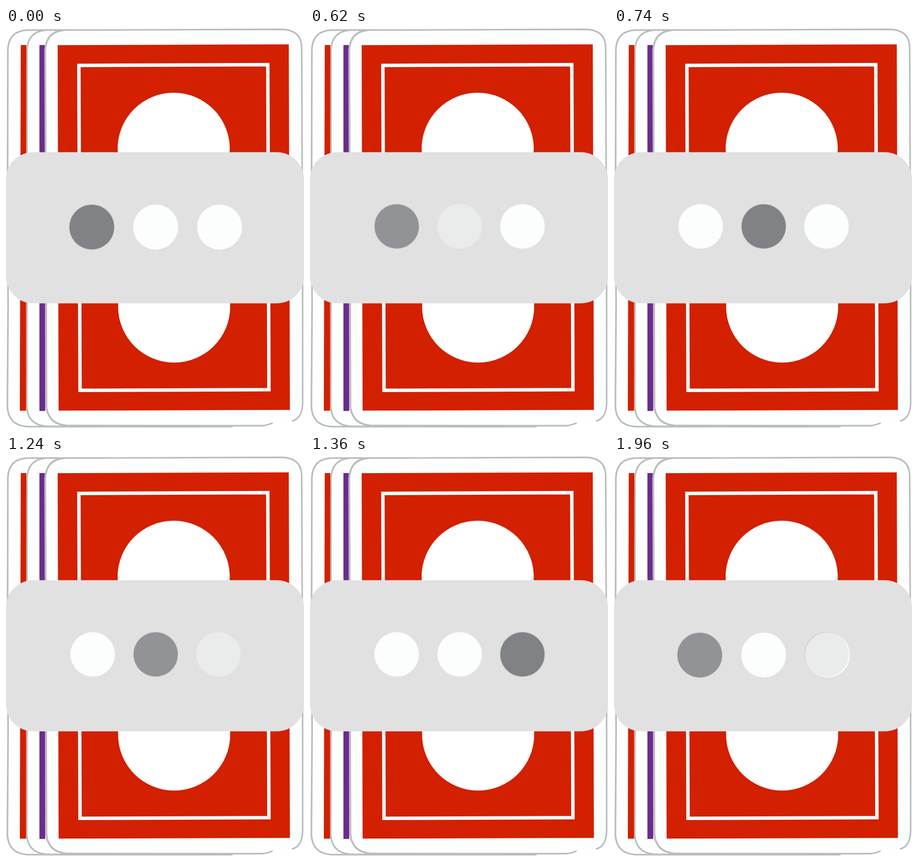
Write an HTML page that moves like this. It is 646 px wide and 868 px high and loops after 1.98 s.

```html
<!DOCTYPE html>
<html lang="en">
<head>
<meta charset="utf-8">
<style>
  html, body { margin: 0; width: 100%; height: 100%; overflow: hidden; background: #fff; }
  svg { display: block; width: 100%; height: 100%; }
</style>
</head>
<body>
<svg viewBox="0 0 646 868">
  <g fill="#fdfffe" stroke="#babdbd" stroke-width="3.6" stroke-linecap="round">
    <path d="M130 4.5H47Q5 6 4 48L3.5 300L4.5 600L3 822Q5 862 46 865H490"/>
    <path d="M130 4.5H88Q47 7 45.5 48V300V600L45 822Q47 861 88 864.5H490"/>
  </g>
  <g fill="#d22000">
    <path d="M32 37H44L43.5 830.5H30Z"/>
    <path fill="#6b2c8c" d="M72.5 37H84L85 831H72.5Z"/>
  </g>
  <path fill="#fdfffe" d="M126 4L598 2.5Q640 4 641 42L643 815Q642 848 620 853L556 863L130 862.5Q92 860 88 822L85 48Q87 8 126 4Z"/>
  <g fill="none" stroke="#babdbd" stroke-width="3.4">
    <path stroke-width="4" d="M126 4.5Q87 8 85 48L86 300L87 600L87.5 822Q92 859 130 862.5"/>
    <path d="M126 4.5L598 3Q640 4 641 42L642 300L643 600V815Q642 847 620 853"/>
    <path d="M130 862.5L556 863Q566 862 578 857"/>
  </g>
  <path fill="#d22000" d="M112 37.3L613 35.4L615.5 828.8L114 830.3Z"/>
  <path fill="none" stroke="#fff" stroke-width="7.4" d="M158 81.2L567.5 79.5L570 784.8L160.5 786.3Z"/>
  <circle cx="363.5" cy="262" r="121.5" fill="#fff"/>
  <circle cx="364.5" cy="604.5" r="121.5" fill="#fff"/>
  <rect y="269.5" width="646" height="328" rx="59" fill="#e1e1e1"/>
  <g id="under"></g>
  <g id="over"></g>
</svg>
<script>
  const LOOP = 1980, STEP = 20, FADE_STEPS = 7;
  const wide = { xs: [186, 324.5, 463], y: 432, r: 48.2 };
  const tight = { xs: [188, 324.5, 460.5], y: 430.5, r: 47.7 };

  // Each slide holds, then dissolves into the next one from `fade` on.
  const slides = [
    { row: wide, active: 0, fade: 200 },
    { row: tight, active: 0, fade: 620 },
    { row: tight, active: 1, fade: 1240 },
    { row: tight, active: 2, fade: 1860 }
  ];

  const under = document.getElementById("under");
  const over = document.getElementById("over");

  function slideMarkup({ row, active }) {
    const dots = row.xs.map((x, i) => {
      const color = i === active ? "#808285" : "#fcfefe";
      return `<circle cx="${x}" cy="${row.y}" r="${row.r}" fill="${color}" stroke="${color}" stroke-width="2" stroke-opacity="0.4"/>`;
    });
    return `<rect x="110" y="360" width="430" height="144" fill="#e1e1e1"/>${dots.join("")}`;
  }

  function show(group, index) {
    if (group.dataset.slide === String(index)) return;
    group.dataset.slide = index;
    group.innerHTML = slideMarkup(slides[index]);
  }

  function render(time) {
    const t = time % LOOP;
    let from = 0;
    while (from < slides.length - 1 && t >= slides[from].fade + (FADE_STEPS - 1) * STEP) from++;
    const elapsed = t - slides[from].fade;
    const mix = elapsed < 0 ? 0 : Math.min(1, (Math.floor(elapsed / STEP) + 1) / FADE_STEPS);
    show(under, from);
    show(over, (from + 1) % slides.length);
    over.setAttribute("opacity", mix);
  }

  const start = performance.now();
  function tick() {
    render(performance.now() - start);
    requestAnimationFrame(tick);
  }
  tick();
</script>
</body>
</html>
```
